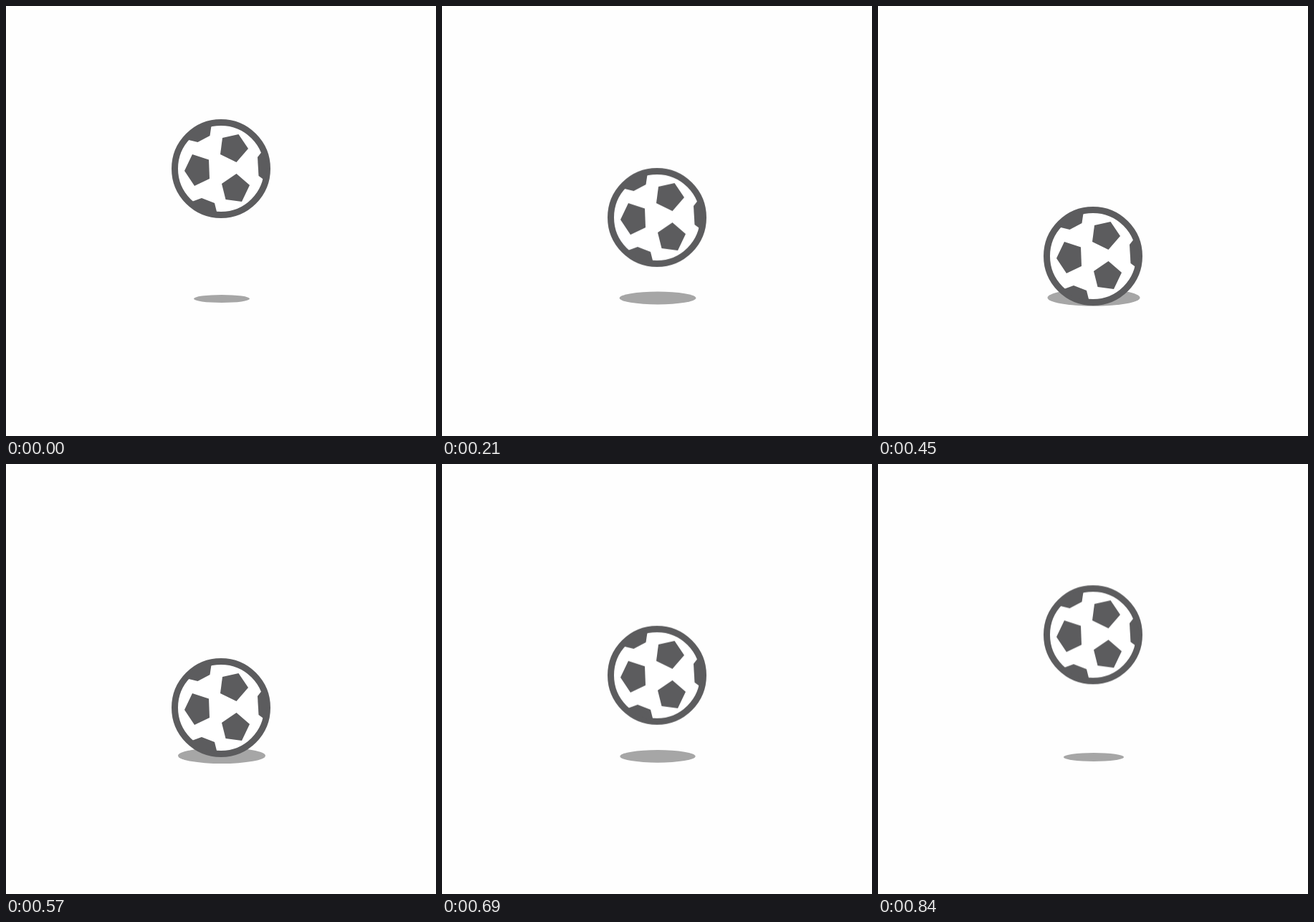
Animation of 600x600 px, one loop 870 ms. Source, as an HTML page without scripts:

```html
<!DOCTYPE html>
<html lang="en">
<head>
<meta charset="utf-8">
<title>Bouncing ball</title>
<style>
  html, body { margin: 0; width: 100%; height: 100%; overflow: hidden; background: #fefefe; }
  svg { display: block; width: 100vw; height: 100vh; }

  .ball, .shadow { animation: bounce 870ms -1ms infinite; }
  .shadow { animation-name: spread; fill: #a6a6a6; }
  .skin { fill: #fff; stroke: #5c5c5e; stroke-width: 9; }
  .patches { fill: #5c5c5e; }

  /* fall, rest on the ground, rise: 29 ticks of 30 ms */
  @keyframes bounce {
    0% { transform: translateY(0); animation-timing-function: steps(12); }
    41.379% { transform: translateY(116.7px); animation-timing-function: steps(3); }
    51.724% { transform: translateY(122px); animation-timing-function: steps(3); }
    62.069% { transform: translateY(121px); animation-timing-function: steps(1); }
    65.517% { transform: translateY(113px); animation-timing-function: steps(10); }
    100% { transform: translateY(0); }
  }
  @keyframes spread {
    0% { rx: 39px; ry: 5.5px; cy: 408.5px; animation-timing-function: steps(12); }
    41.379% { rx: 63.5px; ry: 11.5px; cy: 406.8px; animation-timing-function: steps(3); }
    51.724% { rx: 64.5px; ry: 11.8px; cy: 406.9px; animation-timing-function: steps(3); }
    62.069% { rx: 63px; ry: 11.4px; cy: 407px; animation-timing-function: steps(1); }
    65.517% { rx: 61px; ry: 11px; cy: 407px; animation-timing-function: steps(10); }
    100% { rx: 40px; ry: 5.4px; cy: 409.2px; }
  }
</style>
</head>
<body>
<svg viewBox="0 0 600 600">
  <ellipse class="shadow" cx="301" cy="408.5" rx="39" ry="5.5"/>
  <g class="ball">
    <circle class="skin" cx="300" cy="227" r="64.5"/>
    <g class="patches">
      <path d="M302 184 324.500 179 338 199 321.500 218 299 207Z"/>
      <path d="M260 207 283 214.500 284 241 263 251 249 230Z"/>
      <path d="M321.500 234 340 250 329 273 306.500 270 301 248Z"/>
      <path d="M287 164 284.500 181 267.500 190 251 186 256 178 270 169Z"/>
      <path d="M258 273.500 273 268 291 275 295 291 273 284Z"/>
      <path d="M358 202 351 211 352.500 237 362 244 365 224Z"/>
    </g>
  </g>
</svg>
</body>
</html>
```
